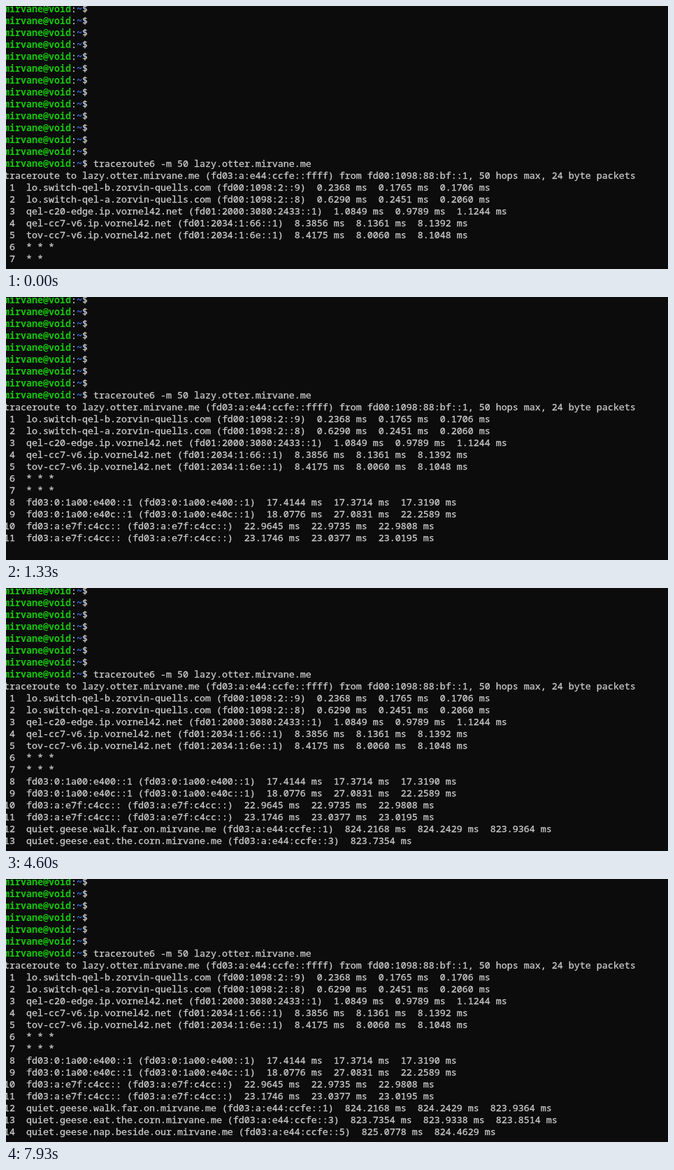
These frames come from a looping animation (947x376 px, 8 s). An HTML page:

```html
<!DOCTYPE html>
<html lang="en">
<head>
<meta charset="utf-8">
<title>Terminal trace</title>
<style>
  html, body { margin: 0; width: 100%; height: 100%; overflow: hidden; background: #0c0c0c; }
  svg { display: block; width: 947px; height: 376px; }
  text {
    font: 13.3333px "Noto Sans Mono", "DejaVu Sans Mono", monospace;
    white-space: pre;
    fill: #ccc;
    stroke: #ccc;
    stroke-width: 0.3px;
  }
  .user, .path { font-weight: 700; stroke: none; }
  .user { fill: #16c60c; }
  .path { fill: #3b78ff; }
</style>
</head>
<body>
<svg id="screen" viewBox="0 0 947 376"></svg>
<script>
const LOOP = 8000, ROWS = 22, ROW_HEIGHT = 17, LEFT = -3, FIRST_BASELINE = 9;
const USER = 'mirvane@void';
const PROMPT = USER + ':~$';
const TARGET = 'lazy.otter.mirvane.me';

const probes = (...times) => times.map(t => `  ${t} ms`).join('');
const hop = (n, host, address, ...times) =>
  `${String(n).padStart(2)}  ${host} (${address})${probes(...times)}`;
const bareHop = (n, address, ...times) => hop(n, address, address, ...times);

const start = [
  ...Array(ROWS).fill(PROMPT),
  `${PROMPT} traceroute6 -m 50 ${TARGET}`,
  `traceroute to ${TARGET} (fd03:a:e44:ccfe::ffff) from fd00:1098:88:bf::1, 50 hops max, 24 byte packets`,
  hop(1, 'lo.switch-qel-b.zorvin-quells.com', 'fd00:1098:2::9', '0.2368', '0.1765', '0.1706'),
  hop(2, 'lo.switch-qel-a.zorvin-quells.com', 'fd00:1098:2::8', '0.6290', '0.2451', '0.2060'),
  hop(3, 'qel-c20-edge.ip.vornel42.net', 'fd01:2000:3080:2433::1', '1.0849', '0.9789', '1.1244'),
  hop(4, 'qel-cc7-v6.ip.vornel42.net', 'fd01:2034:1:66::1', '8.3856', '8.1361', '8.1392'),
  hop(5, 'tov-cc7-v6.ip.vornel42.net', 'fd01:2034:1:6e::1', '8.4175', '8.0060', '8.1048'),
  ' 6  * * *',
  ' 7  * *'
].join('\n');

// Output appended to the terminal: [time in ms, text]
const output = [
  [0, start],
  [930, ' *\n' + bareHop(8, 'fd03:0:1a00:e400::1', '17.4144')],
  [1000, probes('17.3714', '17.3190')],
  [1070, '\n' + bareHop(9, 'fd03:0:1a00:e40c::1', '18.0776', '27.0831')],
  [1130, probes('22.2589') + '\n' + bareHop(10, 'fd03:a:e7f:c4cc::', '22.9645')],
  [1200, probes('22.9735', '22.9808')],
  [1270, '\n' + bareHop(11, 'fd03:a:e7f:c4cc::', '23.1746', '23.0377')],
  [1330, probes('23.0195') + '\n'],
  [2130, hop(12, 'quiet.geese.walk.far.on.mirvane.me', 'fd03:a:e44:ccfe::1', '824.2168')],
  [2930, probes('824.2429')],
  [3800, probes('823.9364')],
  [4600, '\n' + hop(13, 'quiet.geese.eat.the.corn.mirvane.me', 'fd03:a:e44:ccfe::3', '823.7354')],
  [5470, probes('823.9338')],
  [6270, probes('823.8514') + '\n'],
  [7070, hop(14, 'quiet.geese.nap.beside.our.mirvane.me', 'fd03:a:e44:ccfe::5', '825.0778')],
  [7930, probes('824.4629')]
];

const span = (kind, text) => `<tspan class="${kind}">${text}</tspan>`;
const colour = line => line.startsWith(USER)
  ? span('user', USER) + ':' + span('path', '~') + line.slice(USER.length + 2)
  : line;

const screen = document.getElementById('screen');
let shownCount = 0;

function draw(time) {
  const printed = output.filter(([at]) => at <= time);
  if (printed.length !== shownCount) {
    shownCount = printed.length;
    const lines = printed.map(([, text]) => text).join('').split('\n').slice(-ROWS);
    screen.innerHTML = lines.map((line, row) =>
      `<text x="${LEFT}" y="${FIRST_BASELINE + row * ROW_HEIGHT}">${colour(line)}</text>`).join('');
  }
}

const origin = performance.now();
function tick() {
  draw((performance.now() - origin) % LOOP);
  requestAnimationFrame(tick);
}
tick();
</script>
</body>
</html>
```
